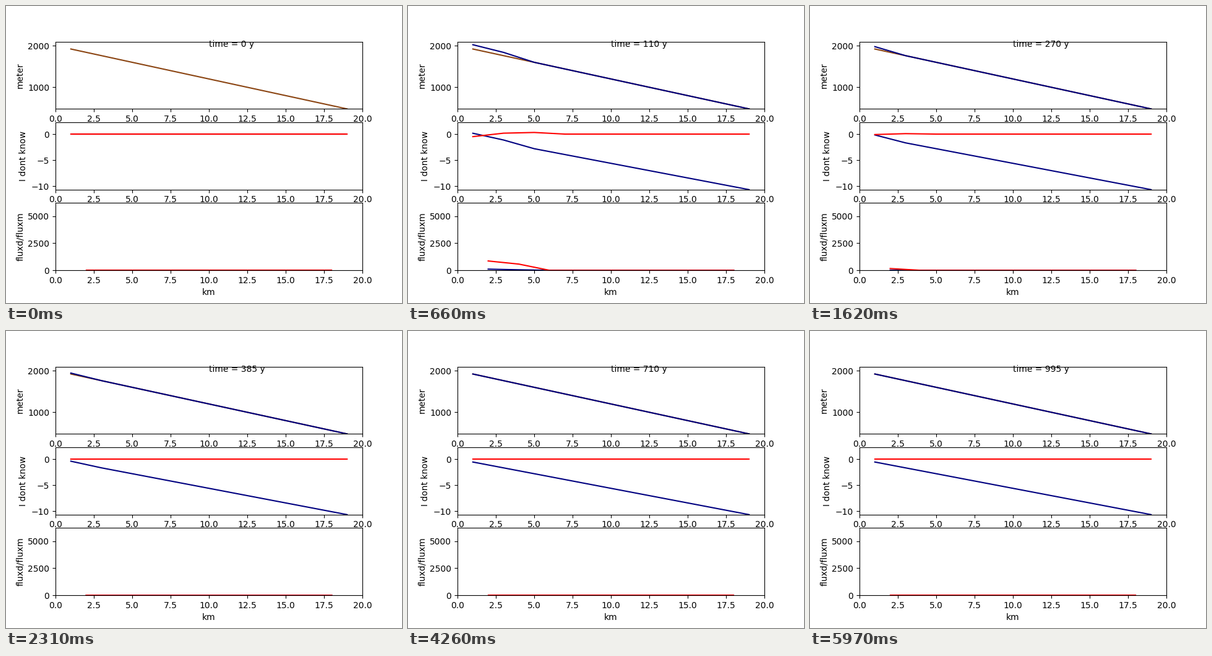
A matplotlib script that plays this animation: 640x480 px, repeating every 6 s.

```python
import numpy as np
import matplotlib.pyplot as plt
from matplotlib.animation import FuncAnimation

FRAMES, INTERVAL = 200, 30
DT = 5             # years per frame
DX = 2000.0        # cell size in metres
ELA = 2000.0       # equilibrium line altitude
GRADIENT = 0.007   # mass balance per metre of height
DEFORM, SLIDE = 1.94e-5, 1.4

x = np.arange(1, 20, 2)
x_mid = np.arange(2, 19, 2)
bed = 2000.0 - 80.0 * x


def fluxes(ice):
    """Deformation and sliding flux between neighbouring cells."""
    slope = -np.diff(bed + ice) / DX

    def between(power):
        p = ice ** power
        return 0.5 * (p[1:] + p[:-1]) * slope ** 3

    return DEFORM * between(5), SLIDE * between(3)


def simulate():
    """Retreat of the glacier, one state per frame; the first is empty."""
    states = [(0 * bed, 0 * bed, 0 * bed, 0.0 * x_mid, 0.0 * x_mid)]
    ice = np.zeros(x.size)
    ice[:6] = 173, 192.5, 198.5, 189, 165.5, 108
    for _ in range(FRAMES - 1):
        height = bed + ice
        balance = GRADIENT * (height - ELA)
        deform, slide = fluxes(ice)
        total = np.concatenate(([0], deform + slide, [0]))
        gain = -np.diff(total) / DX
        states.append((height, balance, gain, deform, slide))
        ice = np.maximum(ice + DT * (balance + gain), 0)
    return states


states = simulate()

fig, (top, mid, low) = plt.subplots(3, 1, figsize=(6.4, 4.8), dpi=100)
panels = (
    (top, "meter", (480, 2097)),
    (mid, "I dont know", (-10.64, 2.25)),
    (low, "fluxd/fluxm", (0, 6200)),
)
for ax, label, ylim in panels:
    ax.set_xlim(0, 20)
    ax.set_ylim(*ylim)
    ax.set_ylabel(label)
low.set_xlabel("km")

top.plot(x, bed, color="saddlebrown")
lines = [
    ax.plot(xs, 0 * xs, color=color)[0]
    for ax, xs, color in (
        (top, x, "navy"),
        (mid, x, "navy"),
        (mid, x, "red"),
        (low, x_mid, "navy"),
        (low, x_mid, "red"),
    )
]
clock = top.text(10, 1975, "")


def update(i):
    for line, values in zip(lines, states[i]):
        line.set_ydata(values)
    clock.set_text(f"time = {i * DT} y")
    return [*lines, clock]


anim = FuncAnimation(fig, update, frames=FRAMES, interval=INTERVAL,
                     repeat=True, repeat_delay=0, blit=False)
plt.show()
```
